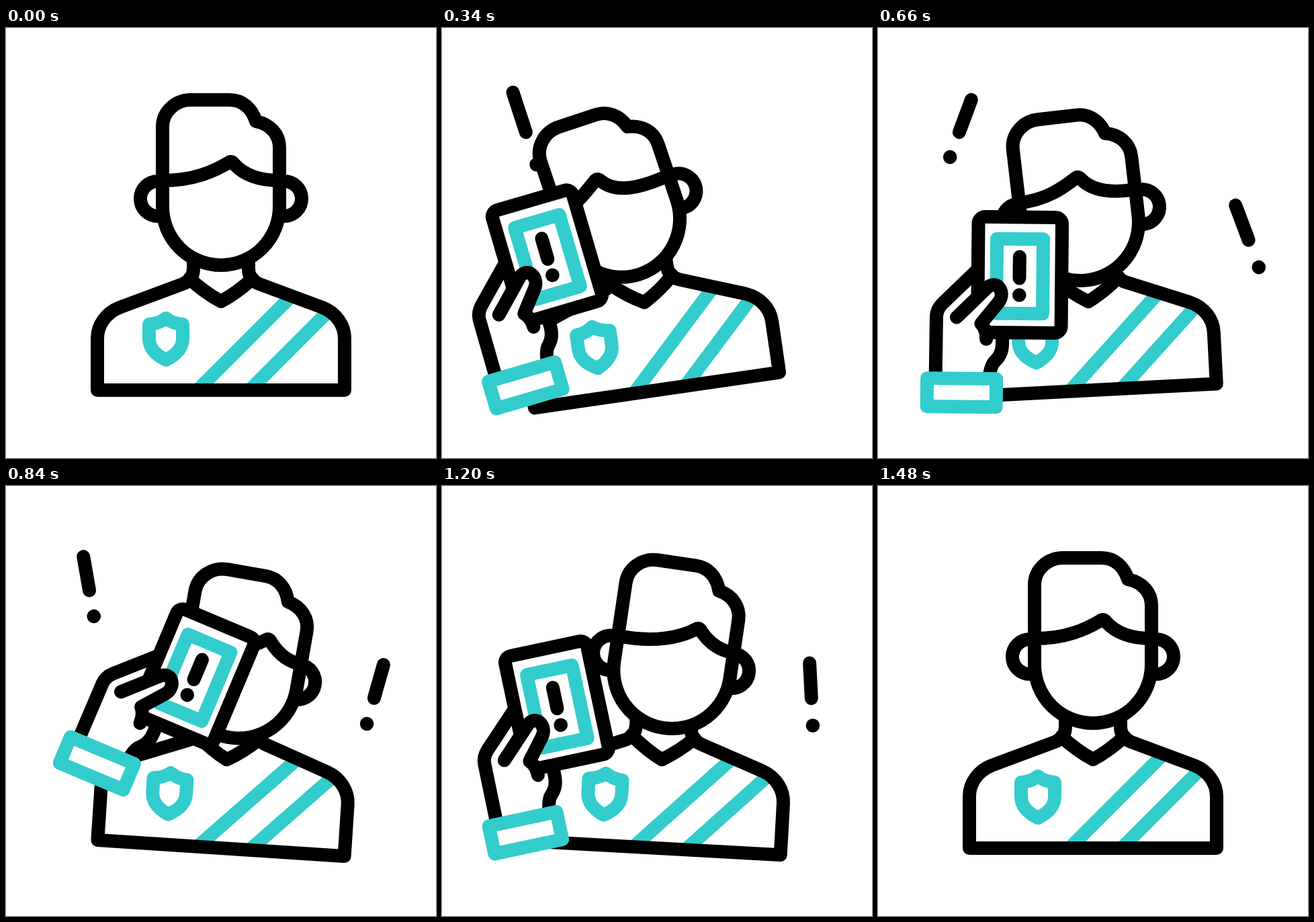
Write an HTML page with a canvas that moves like this. It is 640 by 640 pixels and loops after 1.8 s.

```html
<!DOCTYPE html>
<html lang="en">
<head>
<meta charset="utf-8">
<title>Referee with phone</title>
<style>
  html, body { margin: 0; width: 100%; height: 100%; overflow: hidden; background: #fff; }
  canvas { display: block; width: 100vmin; height: 100vmin; }
</style>
</head>
<body>
<canvas id="stage" width="640" height="640"></canvas>
<script>
const ctx = document.getElementById('stage').getContext('2d');
const LOOP = 1800, MOVE_END = 1480, STEP = 20;
const BLACK = '#000', TEAL = '#33cccc', WHITE = '#fff';
const RIGHT_MARK_DELAY = 220;

// Smooth 0 to 1 between two times.
function ease(t, from, to) {
  const s = Math.min(1, Math.max(0, (t - from) / (to - from)));
  return s * s * (3 - 2 * s);
}

// Eased moves between a few [time, value] poses.
function glide(t, ...poses) {
  let value = poses[0][1];
  for (let i = 1; i < poses.length; i++) {
    value += (poses[i][1] - poses[i - 1][1]) * ease(t, poses[i - 1][0], poses[i][0]);
  }
  return value;
}

// Sway of the person: -1 is fully left, 1 fully right.
const sway = t => glide(t, [0, 0], [455, -1], [970, 1], [1480, 0]);
const lean = (t, left, right) => sway(t) * (sway(t) < 0 ? left : right);

const headDip = t => 23 * ease(t, 0, 490) * (1 - ease(t, 780, 1480));

const armAngle = t => glide(t, [0, 0], [485, -20.8], [840, 22.8], [1200, -12], [1480, 0]);
const armX = t => 124.4 + 0.021 * Math.max(0, armAngle(t)) ** 2;
function armY(t) {
  const fall = Math.max(0, (t - 880) / 600) ** 2.5;
  return glide(t, [0, 940], [320, 531], [570, 578], [880, 405]) + 535 * fall;
}

const markTilt = t => glide(t, [200, 0], [400, -23], [680, 21], [895, -16], [1060, 9]);
function markReach(t) {
  const settle = 20 * Math.exp((285 - t) / 100);
  const stretch = 21 * ease(t, 970, 1030);
  return (45 + settle + stretch) * ease(t, 200, 285) * (1 - ease(t, 1030, 1100));
}

const bodyLine = new Path2D('M279 340 V358 Q279 375 263 381 L169 416 C149 424 136 442 136 462 ' +
  'V539 H504 V462 C504 442 491 424 471 416 L377 381 Q361 375 361 358 V340');
const collar = new Path2D('M273 373 Q296 394 320 407 Q344 394 367 373');
const stripes = new Path2D('M284 540 L425 399 M361.5 540 L481 420.5');
const shield = new Path2D('M238 432 Q248 440 263 441 V462 C263 478 252 487 238 494 ' +
  'C224 487 213 478 213 462 V441 Q228 440 238 432 Z');

// Head, relative to the centre of the jaw circle.
const headLine = new Path2D('M-87 0 V-119 C-87 -141 -68 -159 -45 -159 H13 ' +
  'C31 -159 46 -147 52 -127 C73 -123 87 -108 87 -88 V0 A87 87 0 0 1 -87 0 Z');

// Arm, relative to the centre of the cuff.
const palm = new Path2D('M-39 -20 L-38.5 -113 Q-38 -124 -30 -132 L27 -188 L60 -110 ' +
  'V-74 Q60 -58 50 -48 Q42 -41 41 -20');
const thumb = new Path2D('M-8.5 -112 L36 -156 C43 -163 51 -162 55 -156 ' +
  'C60 -149 58 -140 53 -134 L28 -103 Q36 -95 36 -80');
const thumbFill = new Path2D(thumb);
thumbFill.lineTo(34, -72);
thumbFill.lineTo(4, -72);

function stroke(path, color = BLACK, cap = 'round') {
  ctx.strokeStyle = color;
  ctx.lineCap = cap;
  ctx.stroke(path);
}

function fill(path, color = WHITE) {
  ctx.fillStyle = color;
  ctx.fill(path);
}

function outline(path, color) {
  fill(path);
  stroke(path, color);
}

function disc(x, y, r) {
  const path = new Path2D();
  path.arc(x, y, r, 0, 2 * Math.PI);
  return path;
}

function box(cx, cy, w, h, r = 0) {
  const path = new Path2D();
  path.roundRect(cx - w / 2, cy - h / 2, w, h, r);
  return path;
}

const bar = (x, y0, y1) => new Path2D(`M${x} ${y0} V${y1}`);

function posed(x, y, degrees, draw) {
  ctx.save();
  ctx.translate(x, y);
  ctx.rotate(degrees * Math.PI / 180);
  draw();
  ctx.restore();
}

function drawMark(x, y, t) {
  const reach = markReach(t);
  if (reach < 0.5) return;
  const size = Math.min(1, reach / 45);
  posed(x, y, markTilt(t), () => {
    ctx.lineWidth = 20 * size;
    stroke(bar(0, -reach, 6 * size));
    fill(disc(0, reach, 10.3 * size), BLACK);
  });
}

function drawBody(t) {
  posed(320, 539, lean(t, 9.8, 5.5), () => {
    ctx.translate(-320, -539);
    fill(bodyLine);
    stroke(stripes, TEAL, 'butt');
    stroke(shield, TEAL);
    stroke(bodyLine);
    stroke(collar);
  });
}

// The parting slides with the turn of the head; the longer side hangs lower.
function drawFringe(turn) {
  const peak = 15 + turn;
  const sagLeft = 0.2 * Math.max(0, turn), sagRight = 0.2 * Math.max(0, -turn);
  const fringe = new Path2D();
  fringe.moveTo(-87, -39);
  fringe.bezierCurveTo(-40 + turn / 2, -39 + sagLeft, peak - 25, -53 + sagLeft, peak - 4, -65.5);
  fringe.quadraticCurveTo(peak + 1, -69.5, peak + 5, -63);
  fringe.bezierCurveTo(peak + 17, -50 + sagRight, 52 + 0.8 * turn, -39 + sagRight, 87, -39);
  stroke(fringe);
}

function drawHead(t) {
  const turn = lean(t, 37, 26.5);
  posed(320 + lean(t, 63, 39), 266 + headDip(t), lean(t, 22, 14.6), () => {
    outline(disc(-94 + 0.4 * Math.max(0, -turn), -12, 26));
    outline(disc(94 - 0.4 * Math.max(0, turn), -12, 26));
    outline(headLine);
    drawFringe(turn);
  });
}

function drawArm(t) {
  posed(armX(t), armY(t), armAngle(t), () => {
    outline(palm);
    outline(box(85, -176, 124.5, 172, 10));
    stroke(box(85, -174, 69, 111), TEAL);
    stroke(bar(84.5, -203, -171));
    fill(disc(84.5, -146, 10.3), BLACK);
    fill(thumbFill);
    stroke(thumb);
    outline(box(0, 0, 103, 42), TEAL);
  });
}

function draw(t) {
  ctx.fillStyle = WHITE;
  ctx.fillRect(0, 0, 640, 640);
  ctx.lineJoin = 'round';
  drawMark(123, 149.5, t);
  drawMark(549.5, 310, t - RIGHT_MARK_DELAY);
  ctx.lineWidth = 20;
  drawBody(t);
  drawHead(t);
  drawArm(t);
}

const start = performance.now();
function tick() {
  const t = (performance.now() - start) % LOOP;
  draw(Math.min(MOVE_END, Math.floor(t / STEP) * STEP));
  requestAnimationFrame(tick);
}
tick();
</script>
</body>
</html>
```
